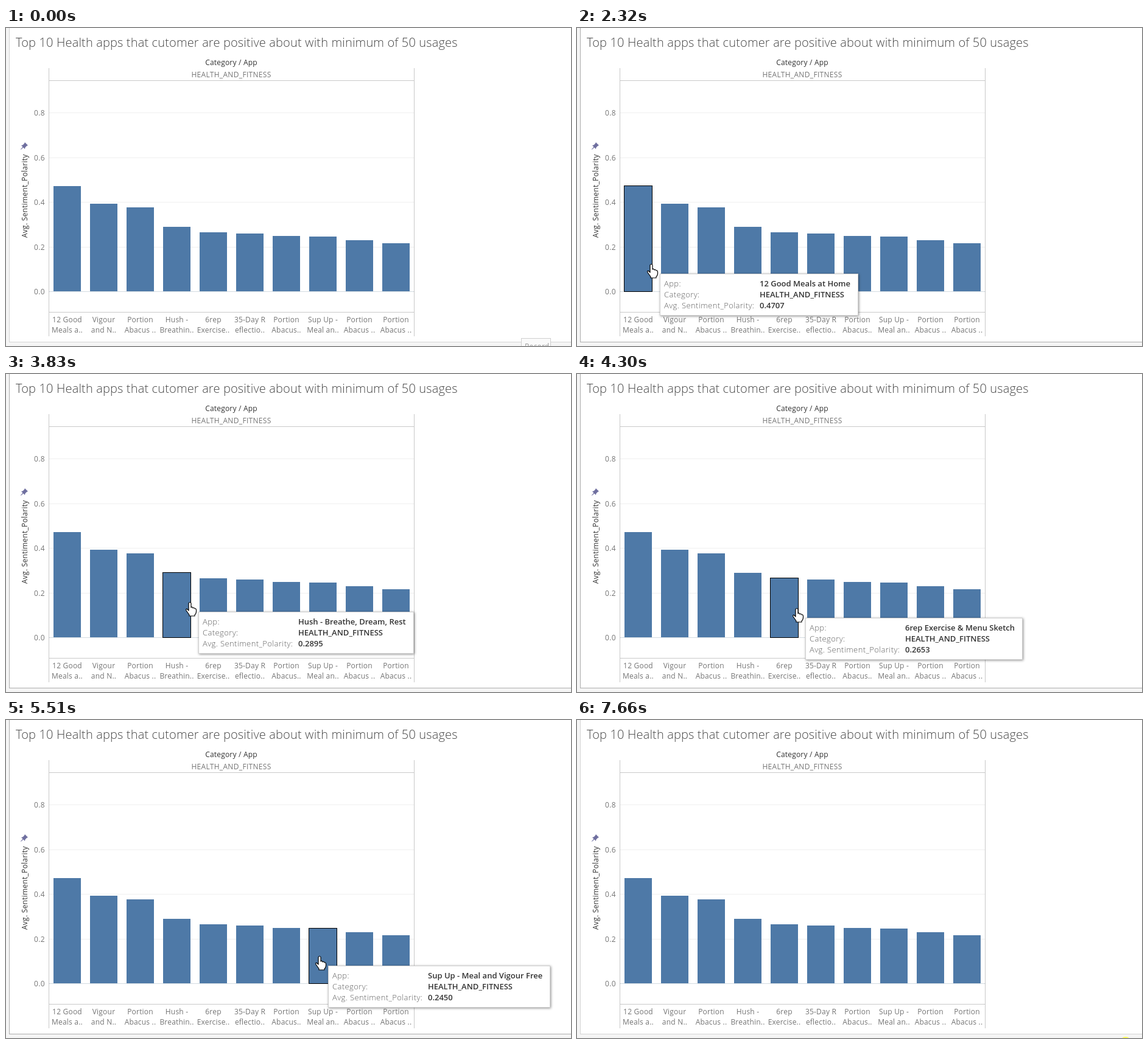
Animation, 928 px wide and 523 px high, one loop 7.71 s. Source, as an HTML page with a canvas:

```html
<!DOCTYPE html>
<html lang="en">
<head>
<meta charset="utf-8">
<title>Health apps</title>
<style>
html, body { margin: 0; height: 100%; overflow: hidden; background: #f5f5f5; }
canvas { display: block; }
</style>
</head>
<body>
<canvas id="stage" width="928" height="523"></canvas>
<script>
const ctx = document.getElementById('stage').getContext('2d');
const LOOP = 7710;
const FONT = '"Open Sans", "Noto Sans", sans-serif';
const ZERO = 433, UNIT = 367.5, BAR = 45;

// value, two axis label lines, full name
const apps = [
  [.4707, '12 Good', 'Meals a..', '12 Good Meals at Home'],
  [.3930, 'Vigour', 'and N..', 'Vigour and Nutrient Notes'],
  [.3768, 'Portion', 'Abacus ..', 'Portion Abacus - Everyday Log'],
  [.2895, 'Hush -', 'Breathin..', 'Hush - Breathe, Dream, Rest'],
  [.2653, '6rep', 'Exercise..', '6rep Exercise & Menu Sketch'],
  [.2580, '35-Day R', 'eflectio..', '35-Day Reflection Adventure'],
  [.2480, 'Portion', 'Abacus..', 'Portion Abacus - TrimJot free'],
  [.2450, 'Sup Up -', 'Meal an..', 'Sup Up - Meal and Vigour Free'],
  [.2299, 'Portion', 'Abacus ..', 'Portion Abacus & Menu Diary'],
  [.2165, 'Portion', 'Abacus ..', 'Portion Abacus - OurGymChum']
].map(([value, line1, line2, name], i) => ({
  value, line1, line2, name, x: 78 + 60 * i, top: Math.floor(ZERO + .6 - value * UNIT)
}));

// pointer path: time, x, y
const path = [
  [520, 872, 524], [830, 45, 484], [1060, 45, 484], [1240, 50, 430], [1540, 50, 430],
  [1680, 74, 395], [2260, 121, 391], [2320, 122, 389], [2480, 134, 393], [3060, 199, 377],
  [3830, 302, 376], [4610, 400, 392], [4800, 420, 386], [5100, 458, 394],
  [5390, 504, 392], [5510, 515, 389], [6170, 584, 394], [6550, 622, 389], [6930, 945, 440]
];

function pointerAt(t) {
  const k = path.findIndex(p => p[0] > t);
  if (k < 1) return null;
  const [t0, x0, y0] = path[k - 1], [t1, x1, y1] = path[k];
  const u = (t - t0) / (t1 - t0);
  return { x: Math.round(x0 + (x1 - x0) * u), y: Math.round(y0 + (y1 - y0) * u) };
}

function box(x, y, w, h, color) {
  ctx.fillStyle = color;
  ctx.fillRect(x, y, w, h);
}

function setFont(size, weight, gap) {
  ctx.font = `${weight} ${size}px ${FONT}`;
  ctx.letterSpacing = gap + 'px';
}

function text(str, x, y, { size = 12, weight = 400, color = '#757575', align = 'left', gap = .2 } = {}) {
  setFont(size, weight, gap);
  ctx.textAlign = align;
  ctx.fillStyle = color;
  ctx.fillText(str, x, y);
}

function shape(d, x, y, fill, stroke) {
  const p = new Path2D(d);
  ctx.save();
  ctx.translate(x, y);
  ctx.fillStyle = fill;
  ctx.fill(p);
  if (stroke) {
    ctx.strokeStyle = stroke;
    ctx.lineWidth = 1.2;
    ctx.lineJoin = 'round';
    ctx.stroke(p);
  }
  ctx.restore();
}

function drawChart(paneActive, axisActive) {
  box(0, 0, 928, 523, '#f5f5f5');
  box(5, 0, 923, 517, paneActive ? '#adadad' : '#d4d4d4');
  box(6, 0, 922, 516, '#fff');
  if (axisActive) box(15, 86, 55, 381, '#f3f3f3');

  text('Top 10 Health apps that cutomer are positive about with minimum of 50 usages', 16, 31,
    { size: 20, weight: 300, color: '#484848', gap: .15 });
  text('Category / App', 370, 61, { weight: 500, color: '#333', align: 'center' });
  text('HEALTH_AND_FITNESS', 370, 81, { align: 'center', gap: .3 });

  for (let i = 0; i < 5; i++) {
    const y = Math.floor(433.5 - i * 73.5);
    text((i * .2).toFixed(1), 64, y + 5, { align: 'right', gap: .4 });
    if (i) box(71, y, 599, 1, '#f0f0f0');
  }
  for (let x = 71; x < 670; x += 2) box(x, ZERO, 1, 1, '#a9b9c4');

  for (const x of [70, 670]) box(x, 66, 1, 441, '#c9c9c9');
  for (const y of [86, 467]) box(70, y, 601, 1, '#c9c9c9');

  for (const app of apps) {
    box(app.x, app.top, BAR, ZERO - app.top, '#4e79a7');
    text(app.line1, app.x + 22.5, 484, { align: 'center' });
    text(app.line2, app.x + 22.5, 501, { align: 'center' });
  }

  ctx.save();
  ctx.translate(35, 345);
  ctx.rotate(-Math.PI / 2);
  text('Avg. Sentiment_Polarity', 0, 0, { weight: 500, color: '#333', gap: .25 });
  ctx.restore();
  shape('M1-6 L6-1 L4 0 L1.5 2.5 L1 5 L-1.5 2.5 L-5.5 6 L-6 5.5 L-2.5 1.5 L-5-1 L-2.5-1.5 L0-4Z', 30, 194, '#6f6f9f');
}

function drawTooltip(app, x, y) {
  const rows = [
    ['App:', app.name],
    ['Category:', 'HEALTH_AND_FITNESS'],
    ['Avg. Sentiment_Polarity:', app.value.toFixed(4)]
  ];
  setFont(13, 600, 0);
  const width = Math.round(177 + Math.max(...rows.map(r => ctx.measureText(r[1]).width)));
  ctx.save();
  ctx.shadowColor = 'rgba(0,0,0,.45)';
  ctx.shadowBlur = 4;
  ctx.shadowOffsetX = ctx.shadowOffsetY = 1;
  box(x, y, width, 69, '#fff');
  ctx.restore();
  ctx.strokeStyle = '#d0d0d0';
  ctx.lineWidth = 1;
  ctx.strokeRect(x + .5, y + .5, width - 1, 68);
  rows.forEach(([label, value], i) => {
    const base = y + 21 + 18 * i;
    text(label, x + 7, base, { size: 13, weight: 300, color: '#606060', gap: .4 });
    text(value, x + 164, base, { size: 13, weight: 600, color: '#333', gap: 0 });
  });
}

const HAND = 'M-2 1 Q0-2 2 1 V8 Q4 6 5 9 Q7 7.500 8 10 Q10 9 10.500 12 V15 Q10 19 8 20 V22 H-1 V20 L-6 13 Q-7 10-4.500 10.500 L-2 13Z';
const ARROW = 'M0 0 V16 L3.700 12.500 L6.200 18.500 L8.700 17.400 L6.200 11.700 H11.300Z';

function draw(t) {
  const pointer = pointerAt(t);
  drawChart(t >= 540 && t < 6930, t >= 1120 && t < 1600);

  if (t < 110) {
    ctx.globalAlpha = t < 60 ? 1 : .4;
    box(846, 510, 49, 13, '#cfcfcf');
    box(847, 511, 47, 12, '#fafafa');
    text('Record', 852, 528, { color: '#999' });
    ctx.globalAlpha = 1;
  }
  if (t >= 7660) {
    ctx.fillStyle = '#ffff55';
    ctx.beginPath();
    ctx.arc(901, 531, 10, 0, 7);
    ctx.fill();
  }
  if (!pointer) return;

  const { x, y } = pointer;
  const app = apps.find(a => x >= a.x && x <= a.x + BAR && y >= a.top && y < ZERO);
  if (app) {
    ctx.strokeStyle = '#000';
    ctx.lineWidth = 1;
    ctx.strokeRect(app.x - .5, app.top - .5, BAR + 1, ZERO - app.top + 1);
    drawTooltip(app, x + 14, y + 15);
  }
  shape(app ? HAND : ARROW, x, y, '#fff', '#000');
}

function tick() {
  draw(performance.now() % LOOP);
  requestAnimationFrame(tick);
}
tick();
</script>
</body>
</html>
```
